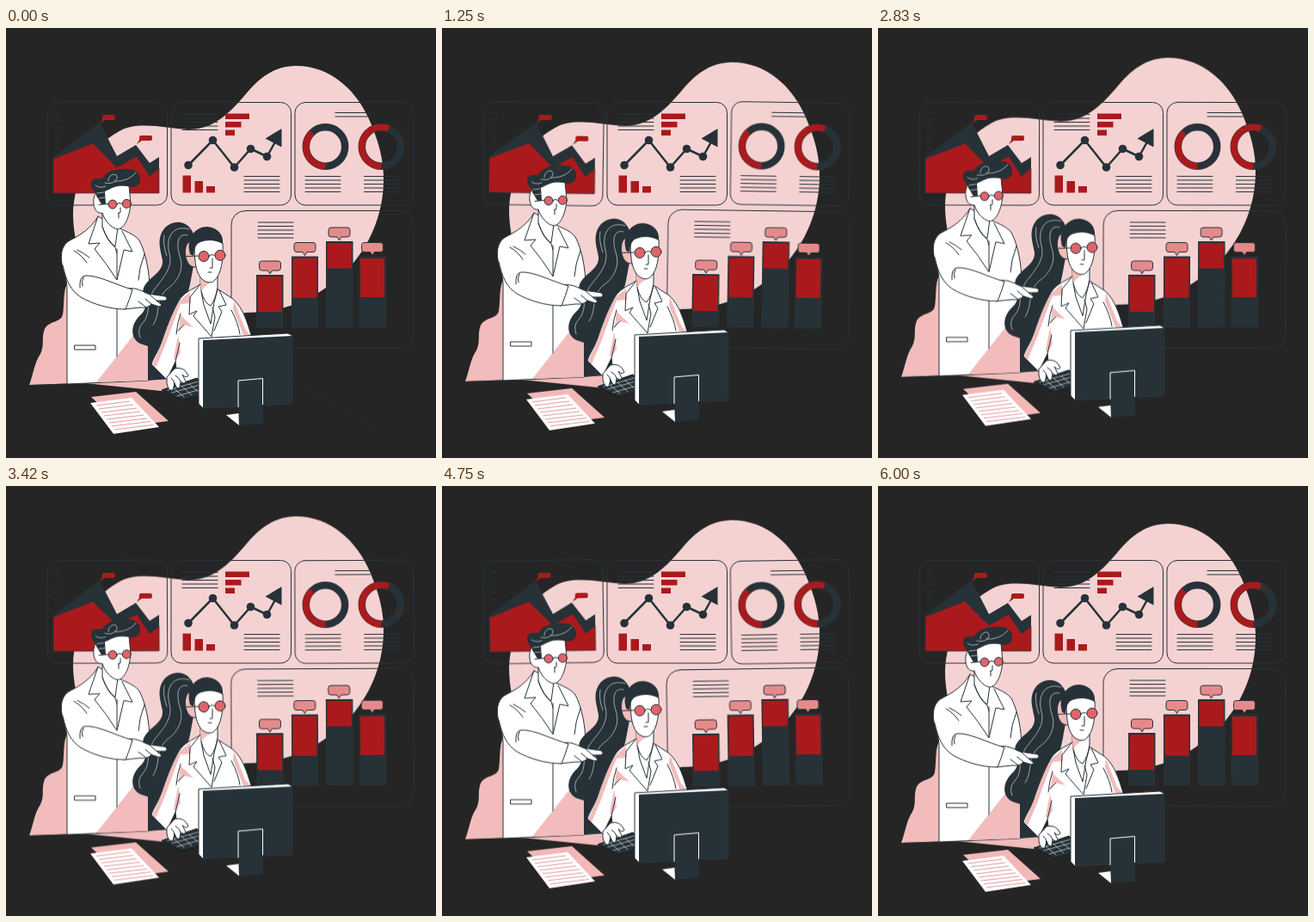
These frames come from a looping animation (500 by 500 pixels, 6040 ms). An HTML page:

```html
<!DOCTYPE html>
<html lang="en">
<head>
<meta charset="utf-8">
<title>Data analysis team</title>
<style>
html, body { margin: 0; width: 100%; height: 100%; overflow: hidden; background: #252525; }
svg { display: block; width: 100vw; height: 100vh; }
.float { animation: float 6040ms linear infinite; }
.sway { animation: sway 6040ms linear infinite; }
.p1 { transform-origin: 118px 146px; }
.p3 { transform-origin: 405px 146px; }
.p4 { transform-origin: 368px 292px; }
@keyframes float { 50% { transform: translateY(-10px); } }
@keyframes sway {
  25% { transform: rotate(1deg); }
  75% { transform: rotate(-1deg); }
}
.ink { fill: #263238; }
.red { fill: #aa1a1c; }
.rose { fill: #f2bcbc; }
.white { fill: #fff; }
.tag { fill: #e58a8b; }
.lens { fill: #e06468; }
.line { fill: none; stroke: #263238; stroke-linecap: round; stroke-linejoin: round; }
.edge { stroke: #263238; stroke-linejoin: round; }
.thin { fill: none; stroke: #d5dadc; stroke-width: .7; stroke-linecap: round; }
</style>
</head>
<body>
<svg viewBox="0 0 500 500">
  <defs>
    <path id="text" class="line" d="M0 0h41M0 4.5h41M0 9h41M0 13.5h41M0 18h41"/>
    <path id="bubble" class="tag edge" d="M3 0H22Q25 0 25 3V8Q25 11 22 11H15L12.500 15L10 11H3Q0 11 0 8V3Q0 0 3 0Z"/>
  </defs>

  <path class="float" fill="#f5d2d2" d="M337 44C378 44 408 73 423 108C433 131 440 155 439 180C438 216 424 254 394 284C360 315 329 330 278 331L190 374L120 340C96 305 78 255 78 216C79 177 99 138 130 121C153 107 185 117 212 118C240 118 258 101 277 79C294 58 312 44 337 44Z"/>

  <g class="sway p1">
    <rect class="line" x="48" y="86.500" width="139.500" height="119.500" rx="12"/>
    <path class="line" d="M57 99h6M57 107h6M57 115h6M57 123h6M57 131h6M57 139h6"/>
    <path class="ink" d="M55 150L75 135L109 110L129 149L151 136L167 157L178 150V192H55Z"/>
    <path class="red edge" stroke-width=".7" d="M55 152L101 134L129 162L152 149L167 172L178 163V192H55Z"/>
    <path class="red" d="M114 101H125Q127 101 127 103V105Q127 107 125 107H115L109 111L112 106V103Q112 101 114 101ZM157 125H168Q170 125 170 127V129Q170 131 168 131H158L152 135L155 130V127Q155 125 157 125Z"/>
  </g>

  <g>
    <rect class="line" x="192" y="86.500" width="139.500" height="119.500" rx="12"/>
    <use href="#text" x="205" y="100.500"/>
    <use href="#text" x="277" y="172.500"/>
    <path class="red" d="M255 99.500h28v6.500h-28zM255 109h18.500v6.500h-18.500zM255 118.500h11v6.500h-11zM205.500 171.500h9.500v20h-9.500zM219.500 178h9.500v13.500h-9.500zM233 184h10v7.500h-10z"/>
    <path class="line" stroke-width="2.500" d="M212 159.500L240.500 130.500L265.500 162L284.500 140.500L303.500 149.500L316 127"/>
    <g class="ink">
      <circle cx="212" cy="159.500" r="4.800"/><circle cx="240.500" cy="130.500" r="4.800"/>
      <circle cx="265.500" cy="162" r="4.800"/><circle cx="284.500" cy="140.500" r="4.800"/>
      <circle cx="303.500" cy="149.500" r="4.800"/>
      <path d="M320.500 117L301.500 128.500L320.500 138.500Z"/>
    </g>
  </g>

  <g class="sway p3">
    <rect class="line" x="336" y="86.500" width="138" height="119.500" rx="12"/>
    <path class="line" d="M383 98.500h41M383 103h41"/>
    <use href="#text" x="348" y="172.500"/>
    <use href="#text" x="416.500" y="172.500"/>
    <g fill="none" stroke-width="8.500">
      <circle cx="371.500" cy="138" r="22.700" stroke="#263238"/>
      <path stroke="#aa1a1c" stroke-width="7.500" d="M371.500 160.700A22.700 22.700 0 0 1 356 121.400"/>
      <circle cx="436.500" cy="138" r="22.700" stroke="#263238"/>
      <path stroke="#aa1a1c" stroke-width="7.500" d="M436.500 160.700A22.700 22.700 0 1 1 445 117"/>
    </g>
  </g>

  <g class="sway p4">
    <rect class="line" x="262" y="212.500" width="212" height="160" rx="16"/>
    <use href="#text" x="293" y="226"/>
    <path class="ink" d="M291 287h31.500v61.500h-31.500zM332 265.500h31v83h-31zM372 248h31.500v100.500h-31.500zM410.500 265.500h31.500v83h-31.500z"/>
    <path class="red" d="M292.500 289h28.500v41h-28.500zM333.500 267.500h28v46h-28zM373.500 250h28.500v29.500h-28.500zM412 268h28v45h-28z"/>
    <use href="#bubble" x="294.500" y="271"/>
    <use href="#bubble" x="335" y="249.500"/>
    <use href="#bubble" x="375" y="232"/>
    <use href="#bubble" x="413.500" y="249.500"/>
  </g>

  <g class="float">
    <!-- floor and desk -->
    <path class="rose" d="M71 297C66 307 68 322 66 333C64 343 49 340 44.500 351C41 361 45 369 40 379C33 389 32 402 27 415L165 410V300Z"/>
    <path class="line" stroke-width=".7" d="M27 415.500L195 410M335 408L430 468"/>
    <path class="rose" d="M92 413L190 408V423Z"/>

    <!-- man -->
    <g class="edge" stroke-width="1">
      <path class="white" d="M107 219C99 233 86 241 76 246C65 251 63 262 65 274C67 284 71 293 71 302V414L165 410V328L167 305C167 285 163 262 155 247C149 239 137 236 129 231Z"/>
      <path class="rose" stroke="none" d="M105 412L150 355Q156 346 165 341V410Z"/>
      <path class="white" d="M112 213V231Q118 248 127 254L130 232Z"/>
      <path class="white" d="M111 191C104 188 101 196 102 205C103 213 108 216 112 215C115 225 123 233 130 234C139 233 144 217 145 204L143 183H114Z"/>
    </g>
    <path class="ink" d="M105 195C104 190 99 188 99 181C99 175 104 175 112 175C116 167 126 164 137 164C149 163 156 168 156 175C157 183 149 187 141 184C130 181 122 187 115 190L116 205H111Z"/>
    <path class="thin" d="M115 180C124 183 132 176 128 171C125 168 118 173 119 178M126 178C135 179 146 175 151 168M104 183Q109 187 116 184M106 192l8-1M108 198l7-1"/>
    <g class="line">
      <path d="M108 205.500L119 204.500M129 204.500Q132 202 135 204.500M133 209V214.500L130.500 215.500M131 215V221"/>
      <g class="lens edge">
        <circle cx="124" cy="205" r="5"/><circle cx="140.300" cy="204.300" r="5"/>
      </g>
      <path d="M107 219L96 251L109 250L103 257Q117 274 129 293L137 258L147 260L135 236M129 257V292M129 326V382M112 231Q118 249 127 255L129 262M79 259Q88 264 94 273M83 258Q91 262 97 267M161 263Q155 278 154 293M80 369H104V374H80Z"/>
    </g>

    <!-- woman's hair, behind the pointing hand -->
    <path class="ink" d="M219 242C214 225 197 221 185 232C174 245 180 258 182 270C183 285 166 289 160 302C156 314 168 321 158 332C145 343 143 360 156 367L165 370V410L187 408L207 320C216 300 215 284 220 270Z"/>
    <path class="thin" d="M213 234C194 228 185 244 190 262C195 281 179 294 171 306C162 320 169 332 159 343Q152 350 156 360M211 241C199 238 198 252 202 265C208 282 198 296 188 303C173 315 180 333 171 345M184 241Q182 251 187 265"/>

    <!-- man's arm -->
    <path class="white edge" d="M139 304C149 300 158 306 165 309L185 312Q189 315 185 317L175 317L181 322Q180 325 175 323L169 321Q165 326 156 325L137 327Z"/>
    <path class="line" d="M166 309L175 317M162 315L169 321M154 318L162 324"/>
    <path class="white" d="M66 276C70 294 75 305 87 313C101 321 120 327 139 327L147 304C128 299 107 287 92 288Q87 291 87 301Z"/>
    <path class="line" d="M66 276C70 294 75 305 87 313C101 321 120 327 139 327Q144 315 147 304C128 299 107 287 92 288Q85 289 86 302M90 290Q87 296 89 300"/>

    <!-- woman -->
    <g class="edge">
      <path class="white" d="M226 298C217 304 207 307 201 317C192 334 186 350 181 365C177 376 171 384 169 391L187 409L197 388L200 414H285V357C280 340 275 325 264 315L247 304Z"/>
      <path class="rose" stroke="none" d="M214 307L215 320L203 321C196 338 190 355 185 369L174 395L170 391Q179 373 184 358C190 341 196 325 203 316ZM203 334L218 348L205 345L200 356L203 377L197 387L195 384L200 358ZM265 317L278 350L284 357H276L264 327Z"/>
      <path class="white" d="M225 283L227 306Q231 321 238 323Q244 315 246 301V283Z"/>
      <path class="rose" stroke="none" d="M225 286L227 309Q229 300 237 297Z"/>
      <path class="rose" d="M221 250C211 244 207 254 209 266C211 276 217 280 224 277Z"/>
      <path class="white" d="M219 248C219 269 220 281 226 290C231 296 239 298 243 293C250 286 253 271 252 250L241 238Z"/>
    </g>
    <path class="ink" d="M213 258C211 244 220 231 234 231C247 232 253 241 252 251Q239 244 226 249Q219 251 218 265L214 263Z"/>
    <g class="line">
      <path d="M210 265.500L224 265M236 265Q240 262 243 265M240 268V279H237M235 284L239 284"/>
      <g class="lens edge">
        <circle cx="230" cy="265.500" r="6"/><circle cx="249" cy="264.300" r="6"/>
      </g>
      <path d="M226 298L214 313L213 333L222 329L218 335L239 359L243 336L240 325M248 305L256 322L247 324L251 330L242 352M227 306L230 322L238 344L242 319L246 304M203 332Q199 344 198 356M207 345L200 352M197 388L202 366M262 328Q270 343 272 356"/>
    </g>

    <!-- keyboard -->
    <path class="ink" stroke="#111d22" d="M181 421L222 407L240 423L205 433Z"/>
    <path class="thin" d="M188 421L224 411M193 424L229 414M199 428L230 419M195 419L207 429M204 416L216 427M213 414L225 424"/>
    <path class="white edge" d="M187 406L196 396Q207 393 212 404Q210 408 205 403L209 411Q208 415 203 411L202 418Q199 421 196 413L194 421Q189 423 187 413Z"/>
    <path class="line" d="M197 404Q202 407 203 411M192 407Q196 410 196 414"/>

    <!-- monitor -->
    <path class="white edge" d="M224 361L328 355L333 358V437L229 442L224 437Z"/>
    <path class="ink" d="M229 363L333 358V437L229 442Z"/>
    <path class="white" d="M256 450L271 448V462Z"/>
    <path class="ink" d="M269 410L298 407L299 460L271 462Z"/>
    <path fill="none" stroke="#fff" d="M270 441V410L298.500 407.500V438"/>

    <!-- papers -->
    <path fill="#f2b8b8" d="M99 429L151 423L189 457L136 464Z"/>
    <path class="white" d="M98 436L146 430L178 464L125 472Z"/>
    <path fill="none" stroke="#d98083" stroke-width=".8" d="M105 439L144 434M108 443L148 438M111 447L152 442M114 451L156 446M117 455L160 450M120 459L164 454M123 463L168 457.500M126 467L171 461.500"/>
  </g>
</svg>
</body>
</html>
```
